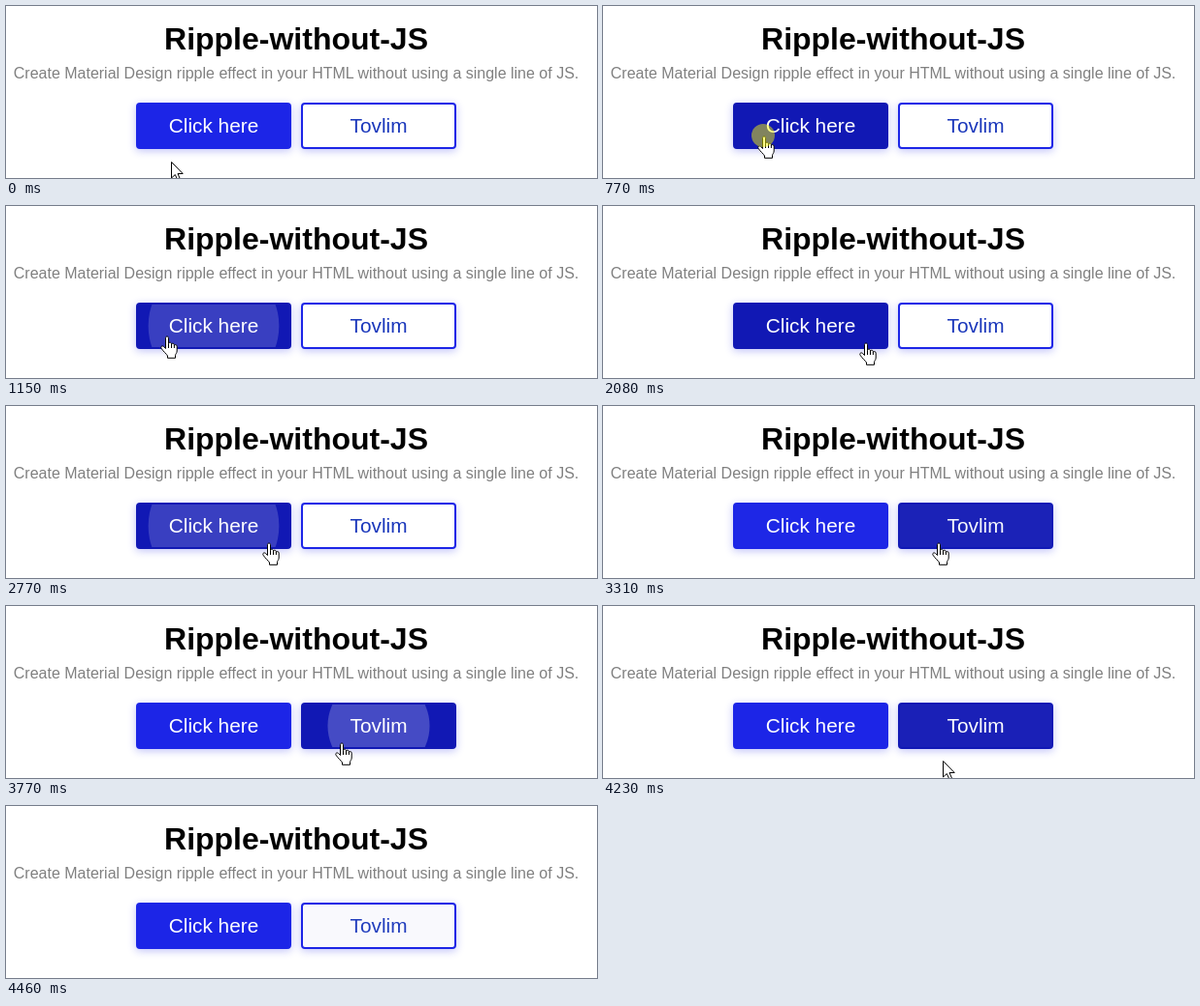
An HTML page for the animation above (4.54 s loop, 609x178 px).

```html
<!DOCTYPE html>
<html lang="en">
<head>
<meta charset="utf-8">
<title>Ripple-without-JS</title>
<style>
  html, body { margin: 0; width: 100%; height: 100%; overflow: hidden; background: #fff; }
  body { position: relative; font-family: "Liberation Sans", Arial, sans-serif; }
  h1, p {
    position: absolute; left: 0; width: 598px; margin: 0;
    text-align: center; white-space: nowrap;
  }
  h1 { top: 16px; font-size: 32px; line-height: 36px; color: #000; }
  p { top: 61px; font-size: 16px; line-height: 17px; color: #808080; }
  .btn {
    position: absolute; top: 100px; width: 160px; height: 48px;
    box-sizing: border-box; border: 2px solid; border-radius: 4px; overflow: hidden;
    font-size: 20.8px; line-height: 43px; text-align: center;
    box-shadow: 0 2px 8px rgba(28, 37, 231, .28);
  }
  #click { left: 134px; }
  #link { left: 304px; }
  .wave {
    position: absolute; left: 50%; top: 50%; width: 162px; height: 162px;
    margin: -81px; border-radius: 50%; background: #fff;
  }
  svg { position: absolute; left: 0; top: 0; }
  #hand, #arrow { fill: #fff; stroke: #000; stroke-linejoin: round; }
</style>
</head>
<body>
<h1>Ripple-without-JS</h1>
<p>Create Material Design ripple effect in your HTML without using a single line of JS.</p>
<div class="btn" id="click">Click here<i class="wave"></i></div>
<div class="btn" id="link">Tovlim<i class="wave"></i></div>
<svg width="609" height="178">
  <g id="cursor">
    <path id="arrow" d="M.5 .5V17L4.3 13.5 7 19.6 9.6 18.5 7 12.5H12.2Z"/>
    <path id="hand" transform="translate(-6 0)" d="M5.5 13.5V2.5C5.5 .5 8.5 .5 8.5 2.5V8.5C8.5 6.8 11.5 6.8 11.5 8.8V9.4C11.5 7.8 14.4 7.8 14.4 9.8V10.6C14.4 9.2 17.2 9.2 17.2 11.2V16C17.2 18.4 15.5 19 15.5 20.8V23.3H7.5V21C6.5 19.3 2.5 15.8 1 13.2C0 11.3 2.3 10.1 3.7 11.6ZM8.5 8.5V13M11.5 9V13M14.4 10.2V13"/>
    <circle id="press" r="12" fill="#ff0" fill-opacity=".47"/>
  </g>
</svg>
<script>
  const LOOP = 4540, TICKS = 59, TICK = LOOP / TICKS;
  const BLUE = [28, 37, 231], NAVY = [17, 24, 180], INK = [26, 55, 187], WHITE = [255, 255, 255];
  const $ = id => document.getElementById(id);

  // All moments are in ticks.
  const buttons = [
    { el: $('click'), hover: [.9, 39.7], releases: [11.55, 32.55], fill: BLUE, ink: WHITE },
    { el: $('link'), hover: [40.1, 54.9], releases: [46.55], fill: WHITE, ink: INK }
  ];
  const presses = [[10, 12], [32, 33], [45, 47]];
  const path = [
    [0, 170, 161], [1, 168, 143], [2, 166, 136], [3, 165, 134], [20, 165, 134],
    [27, 270, 141], [39, 270, 141], [40, 309, 142], [41, 333, 142], [43, 345, 141],
    [54, 345, 141], [55, 350, 160]
  ];

  const clamp = x => Math.min(1, Math.max(0, x));
  const mix = (a, b, k) => a + (b - a) * k;
  const blend = (a, b, k) => `rgb(${a.map((v, i) => Math.round(mix(v, b[i], k)))})`;

  // CSS "ease": cubic-bezier(.25, .1, .25, 1)
  function ease(x) {
    x = clamp(x);
    const curve = (s, a, b) => 3 * a * s * (1 - s) ** 2 + 3 * b * s * s * (1 - s) + s ** 3;
    let lo = 0, hi = 1;
    for (let i = 0; i < 24; i++) {
      const mid = (lo + hi) / 2;
      if (curve(mid, .25, .25) < x) lo = mid; else hi = mid;
    }
    return curve(lo, .1, 1);
  }

  const since = (tick, start, ms) => ease((tick - start) * TICK / ms);

  function drawButton({ el, hover, releases, fill, ink }, tick) {
    const k = since(tick, hover[0], 300) - since(tick, hover[1], 300);
    el.style.backgroundColor = blend(fill, NAVY, k);
    el.style.borderColor = blend(BLUE, NAVY, k);
    el.style.color = blend(ink, WHITE, k);

    const start = releases.filter(r => r <= tick).pop();
    const wave = el.querySelector('.wave').style;
    const on = start !== undefined;
    wave.opacity = on ? .3 * (1 - since(tick, start, 1000)) : 0;
    wave.transform = `scale(${on ? since(tick, start, 500) : 0})`;
  }

  function cursorAt(tick) {
    const i = path.findIndex(p => p[0] >= tick);
    const b = path[i], a = path[Math.max(0, i - 1)];
    const k = a === b ? 0 : (tick - a[0]) / (b[0] - a[0]);
    const s = k * k * (3 - 2 * k);
    return [mix(a[1], b[1], s), mix(a[2], b[2], s)].map(Math.round);
  }

  const show = (id, on) => $(id).setAttribute('visibility', on ? 'visible' : 'hidden');

  function drawCursor(tick) {
    const seen = tick <= 55, over = tick > 0 && tick < 55;
    show('arrow', seen && !over);
    show('hand', over);
    show('press', presses.some(([from, to]) => tick >= from && tick < to));
    if (seen) $('cursor').setAttribute('transform', `translate(${cursorAt(tick)})`);
  }

  const begin = performance.now();
  function frame() {
    const t = (performance.now() - begin) % LOOP;
    // Ticks fall on rounded hundredths, so lean slightly early.
    const tick = Math.floor((t + 8) / TICK) % TICKS;
    buttons.forEach(b => drawButton(b, tick));
    drawCursor(tick);
    requestAnimationFrame(frame);
  }
  frame();
</script>
</body>
</html>
```
